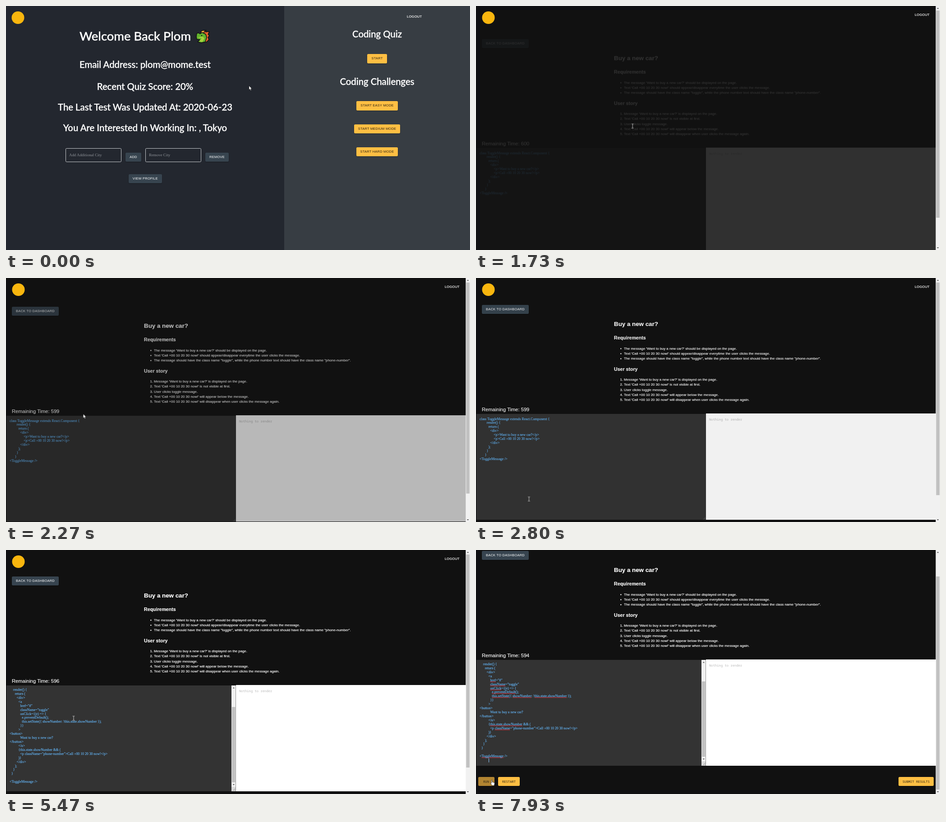
Animation of 1029 by 544 pixels, one loop 8000 ms. Source, as an HTML page:

```html
<!DOCTYPE html>
<html lang="en">
<head>
<meta charset="utf-8">
<title>Coding challenge</title>
<style>
@property --left { syntax: "<integer>"; inherits: false; initial-value: 600; }
html, body { margin: 0; width: 100%; height: 100%; overflow: hidden; background: #111; }
body, .layer { position: absolute; inset: 0; }
svg { position: absolute; left: 0; top: 0; overflow: visible; }
body { font: 7.8px "Liberation Sans", Arial, sans-serif; color: #fff; }
text { fill: #fff; stroke: #fff; stroke-width: .18px; }
body *, .timer::after { animation: 8s linear infinite; }

.btn { position: absolute; height: 20.3px; border-radius: 2.3px; background: #37444f; color: #fff;
  font-size: 7.5px; line-height: 20.5px; letter-spacing: .0286em; text-align: center; white-space: nowrap;
  box-shadow: 0 1px 2px rgba(0,0,0,.3); }
.gold { background: #ffbf43; color: #2b2413; }
.mono { font-family: "Noto Sans Mono", "DejaVu Sans Mono", monospace; font-size: 7.2px; letter-spacing: 0; }

/* dashboard */
.dash { background: linear-gradient(90deg, #23272f 617.5px, #373d43 617.5px); animation-name: dash; animation-timing-function: step-end; }
.dash .head { font: 500 20.3px Lato, sans-serif; text-anchor: middle; }
.head text { stroke-width: .4px; }
.dash .title { font-size: 27.4px; }
.dash .hint { font: 8.9px "Liberation Serif", serif; fill: #90949a; stroke: none; }
.easy { animation-name: easy; }
@keyframes dash { 0% { visibility: visible; } 15.6%, 100% { visibility: hidden; } }
@keyframes easy { 0%, 9% { background: #ffbf43; } 12%, 100% { background: #b2862f; } }

/* challenge page */
.page { animation-name: scroll; }
.body { animation-name: rise; }
@keyframes scroll { 0%, 82.2% { transform: none; animation-timing-function: ease-in-out; } 86.6%, 100% { transform: translateY(-57px); } }
@keyframes rise {
  0%, 18.75% { opacity: 0; transform: translateY(17px); animation-timing-function: ease; }
  41.9%, 100% { opacity: 1; transform: none; }
}
.h2 { font-weight: bold; font-size: 13.35px; }
.h3 { font-weight: bold; font-size: 10.6px; }
.timer { position: absolute; left: 13px; top: 286px; font-size: 11.15px; line-height: 13px; white-space: pre; -webkit-text-stroke: .15px; }
.timer::after { counter-reset: left var(--left); content: counter(left); animation-name: countdown; animation-timing-function: step-end; }
@keyframes countdown {
  0% { --left: 600; } 28.3% { --left: 599; } 40.8% { --left: 598; } 53.3% { --left: 597; }
  65.8% { --left: 596; } 78.3% { --left: 595; } 90.8%, 100% { --left: 594; }
}
.editor { position: absolute; left: 1px; top: 302px; width: 508.5px; height: 236px; background: #333; overflow: hidden; }
.result { position: absolute; left: 510px; top: 301.4px; width: 510px; height: 237px; background: #fff; color: #b9b9b9; }
.result span { position: absolute; left: 7px; top: 8px; }

pre { position: absolute; left: 7px; top: 7.5px; margin: 0; color: #64b5f6; -webkit-text-stroke: .15px;
  font: 7.8px/8.92px "Liberation Serif", "Times New Roman", serif; }
u { text-decoration: underline .7px #e0313c; text-underline-offset: .8px; }
mark { background: #0a66d8; color: #fff; padding-right: 2px; -webkit-box-decoration-break: clone; box-decoration-break: clone; }
.before { animation-name: before; animation-timing-function: step-end; }
.select { animation-name: select; }
.after, .bar { animation-name: after; animation-timing-function: step-end; }
.after pre { animation-name: wheel; }
.after u { animation-name: spell; animation-timing-function: step-end; }
.thumb { animation-name: thumb; }
.caret { position: absolute; width: .8px; height: 9px; background: #8fcbff; animation-name: caret; animation-timing-function: step-end; }
@keyframes before { 0% { visibility: visible; } 59.4%, 100% { visibility: hidden; } }
@keyframes after { 0% { opacity: 0; } 59.4%, 100% { opacity: 1; } }
@keyframes select { 0%, 42.5% { clip-path: inset(100% 0 0 0); animation-timing-function: steps(12); } 47.5%, 100% { clip-path: inset(0); } }
@keyframes wheel { 0%, 65.5% { transform: none; animation-timing-function: ease-in-out; } 68.2%, 100% { transform: translateY(-55.5px); } }
@keyframes thumb { 0%, 65.5% { transform: none; animation-timing-function: ease-in-out; } 68.2%, 100% { transform: translateY(38px); } }
@keyframes spell { 0% { text-decoration-color: transparent; } 72.4%, 100% { text-decoration-color: #e0313c; } }
@keyframes caret {
  0%, 59.4%, 72.6%, 85.9%, 99.1%, 100% { opacity: 1; }
  66%, 79.2%, 92.5% { opacity: 0; }
}
.run { animation-name: run; }
@keyframes run { 0%, 95.8% { background: #ffbf43; } 98.4%, 100% { background: #b28531; } }
.pagethumb { animation-name: pagethumb; }
@keyframes pagethumb {
  0%, 18.75% { y: 10px; height: 460px; animation-timing-function: ease; }
  41.9%, 82.2% { y: 10px; height: 475px; animation-timing-function: ease-in-out; }
  86.6%, 100% { y: 59px; height: 475px; }
}

/* pointer */
.pointer { animation-name: move; }
@keyframes move {
  0%, .6% { transform: translate(539px, 178px); }
  4.5% { transform: translate(665px, 170px); }
  8% { transform: translate(785px, 190px); animation-timing-function: ease-out; }
  10.9%, 15.6% { transform: translate(815px, 219px); }
  21.625% { transform: translate(347.5px, 267.5px); }
  28.375% { transform: translate(171.5px, 302.7px); animation-timing-function: ease-out; }
  35%, 38% { transform: translate(117.5px, 492.7px); animation-timing-function: ease-in-out; }
  45.9%, 56% { transform: translate(11px, 306.5px); animation-timing-function: ease-in-out; }
  63.4%, 66% { transform: translate(150px, 372.5px); }
  68.2%, 72.5% { transform: translate(150px, 375px); animation-timing-function: ease-in-out; }
  80%, 88.4% { transform: translate(257px, 231px); animation-timing-function: ease-in-out; }
  98%, 100% { transform: translate(35px, 513px); }
}
.arrow, .beam, .hand { animation-timing-function: step-end; }
.arrow { animation-name: arrow; }
.beam { animation-name: beam; }
.hand { animation-name: hand; }
@keyframes arrow { 0%, 15.6%, 25%, 77% { opacity: 1; } 9%, 20%, 29%, 95.8%, 100% { opacity: 0; } }
@keyframes beam { 0%, 25%, 64.1%, 77%, 100% { opacity: 0; } 20%, 29%, 65.9% { opacity: 1; } }
@keyframes hand { 0%, 15.6% { opacity: 0; } 9%, 95.8%, 100% { opacity: 1; } }
</style>
</head>
<body>

<div class="layer page">
  <svg width="1029" height="601">
    <circle cx="27.5" cy="26" r="14" fill="#f9b60e"/>
    <text x="973" y="22.3" font-size="7.5" letter-spacing=".2">LOGOUT</text>
  </svg>
  <div class="layer body">
    <div class="btn" style="left:13px;top:59px;width:104px">BACK TO DASHBOARD</div>
    <svg width="1029" height="601">
      <text class="h2" x="306" y="106.2">Buy a new car?</text>
      <text class="h3" x="306" y="135.8">Requirements</text>
      <g fill="#fff"><circle cx="321.3" cy="156.6" r="1.25"/><circle cx="321.3" cy="167.7" r="1.25"/><circle cx="321.3" cy="178.9" r="1.25"/></g>
      <text y="147.5">
        <tspan x="328" dy="11.15">The message 'Want to buy a new car?' should be displayed on the page.</tspan>
        <tspan x="328" dy="11.15">Text 'Call +00 10 20 30 now!' should appear/disappear everytime the user clicks the message.</tspan>
        <tspan x="328" dy="11.15">The message should have the class name "toggle", while the phone number text should have the class name "phone-number".</tspan>
      </text>
      <text class="h3" x="306" y="205.5">User story</text>
      <text y="217.1">
        <tspan x="319.4" dy="11.15">1.</tspan><tspan x="328">Message 'Want to buy a new car?' is displayed on the page.</tspan>
        <tspan x="319.4" dy="11.15">2.</tspan><tspan x="328">Text 'Call +00 10 20 30 now!' is not visible at first.</tspan>
        <tspan x="319.4" dy="11.15">3.</tspan><tspan x="328">User clicks toggle message.</tspan>
        <tspan x="319.4" dy="11.15">4.</tspan><tspan x="328">Text 'Call +00 10 20 30 now!' will appear below the message.</tspan>
        <tspan x="319.4" dy="11.15">5.</tspan><tspan x="328">Text 'Call +00 10 20 30 now!' will disappear when user clicks the message again.</tspan>
      </text>
    </svg>
    <div class="timer">Remaining Time: </div>
    <div class="editor">
      <div class="before"><pre>class ToggleMessage extends React.Component {
        render() {
          return (
            &lt;div>
                &lt;p>Want to buy a new car?&lt;/p>
                &lt;p>Call +00 10 20 30 now!&lt;/p>
            &lt;/div>
          );
        }
      }
&lt;ToggleMessage /></pre><pre class="select"><mark>class ToggleMessage extends React.Component {
        render() {
          return (
            &lt;div>
                &lt;p>Want to buy a new car?&lt;/p>
                &lt;p>Call +00 10 20 30 now!&lt;/p>
            &lt;/div>
          );
        }
      }
&lt;<u>ToggleMessage</u> />
         </mark></pre></div>
      <div class="after"><pre>class <u>ToggleMessage</u> extends <u>React.Component</u> {
    constructor(props) {
      super(props);
      this.state = { <u>showNumber</u>: false };
    }

    render() {
      return (
        &lt;div>
          &lt;a
            <u>href</u>="#"
            <u>className</u>="toggle"
            <u>onClick</u>={(e) => {
              <u>e.preventDefault</u>();
              <u>this.setState</u>({ <u>showNumber</u>: !<u>this.state.showNumber</u> });
            }}
          >
&lt;button>
            Want to buy a new car?
&lt;/button>
          &lt;/a>
          {<u>this.state.showNumber</u> &amp;&amp; (
            &lt;p <u>className</u>="phone-number">Call +00 10 20 30 now!&lt;/p>
          )}
        &lt;/div>
      );
    }
  }

&lt;<u>ToggleMessage</u> />
          <i class="caret"></i></pre></div>
    </div>
    <svg width="1029" height="601">
      <path d="M504 537.5l5-5M507 537.5l2-2" stroke="#777" stroke-width=".7"/>
      <g class="bar">
        <path fill="#f1f1f1" d="M500 302h9.5v226h-9.5z"/>
        <path fill="#dcdcdc" d="M500 528h9.5v10h-9.5z"/>
        <path d="M503 537l5.5-5.5M506 537l2.5-2.5" stroke="#777" stroke-width=".7"/>
        <path fill="#505050" d="M502.7 308.5l2.2-2.4 2.2 2.4zM502.7 522l2.2 2.4 2.2-2.4z"/>
        <rect class="thumb" x="501" y="312" width="7.5" height="168" fill="#c1c1c1"/>
      </g>
    </svg>
    <div class="result mono"><span>Nothing to render</span></div>
    <div class="btn gold mono run" style="left:4.5px;top:563px;width:36px">RUN</div>
    <div class="btn gold mono" style="left:49px;top:563px;width:48px">RESTART</div>
    <div class="btn gold mono" style="left:937px;top:563px;width:78px">SUBMIT RESULTS</div>
  </div>
</div>

<svg width="1029" height="544">
  <path fill="#f1f1f1" d="M1019.5 0h9.5v544h-9.5z"/>
  <path fill="#505050" d="M1022 6.2l2.3-2.5 2.3 2.5zM1022 538l2.3 2.5 2.3-2.5z"/>
  <rect class="pagethumb" x="1020.5" y="10" width="7.5" height="475" fill="#c1c1c1"/>
</svg>

<div class="layer dash">
  <svg width="1029" height="544">
    <circle cx="26.5" cy="26" r="14" fill="#f9b60e"/>
    <text x="889" y="26.2" font-size="7.6" letter-spacing=".2">LOGOUT</text>
    <g class="head">
      <text class="title" x="286.5" y="77">Welcome Back Plom</text>
      <text x="308.5" y="138.3">Email Address: plom@mome.test</text>
      <text x="308.5" y="187">Recent Quiz Score: 20%</text>
      <text x="308.5" y="233">The Last Test Was Updated At: 2020-06-23</text>
      <text x="308.5" y="279">You Are Interested In Working In: , Tokyo</text>
      <text x="823" y="70.3">Coding Quiz</text>
      <text x="823" y="176">Coding Challenges</text>
    </g>
    <g stroke="#111" stroke-width="1.5" stroke-linejoin="round">
      <path fill="#f0642d" d="M434 56l10-2-2 4 9-1-3 6 3 3-3 4 2 5-5 5-11 1z"/>
      <path fill="#fbb43a" d="M431 61l3-6 8-1-5 8z"/>
      <path fill="#62b32e" d="M423 61l4-1 3 2 5-3 8 4 2 7-3 10-9 2-8-2 5-5-7-1-1-5z"/>
      <path fill="#a6d23c" stroke="none" d="M424 70l10 2-6 7 8 1 4-8-4-4z"/>
      <circle cx="434" cy="66" r="1.3" fill="#111" stroke="none"/>
    </g>
    <g fill="none" stroke="#c6c9cc">
      <rect x="132.5" y="317.5" width="123" height="30" rx="2"/>
      <rect x="309.5" y="317.5" width="123" height="30" rx="2"/>
    </g>
    <text class="hint" x="140" y="335.3">Add Additional City</text>
    <text class="hint" x="317" y="335.3">Remove City</text>
  </svg>
  <div class="btn" style="left:265px;top:327px;width:35px">ADD</div>
  <div class="btn" style="left:442px;top:327px;width:52px">REMOVE</div>
  <div class="btn" style="left:272px;top:375px;width:73.5px">VIEW PROFILE</div>
  <div class="btn gold" style="left:801px;top:107.4px;width:44px">START</div>
  <div class="btn gold easy" style="left:777px;top:212.4px;width:92px">START EASY MODE</div>
  <div class="btn gold" style="left:772px;top:263.8px;width:102px">START MEDIUM MODE</div>
  <div class="btn gold" style="left:777px;top:315px;width:92px">START HARD MODE</div>
</div>

<svg width="1029" height="544">
  <g class="pointer">
    <path class="arrow" d="M0 0v8.7l2-1.7 1.4 3.2 1.5-.7-1.4-3h2.7z" fill="#fff" stroke="#111" stroke-width=".5"/>
    <path class="beam" d="M-2.3-4.7h1.7l.6.5.6-.5h1.7M-2.3 4.7h1.7l.6-.5.6.5h1.7M0-4.2v8.4" fill="none" stroke="#ddd" stroke-width=".9"/>
    <path class="hand" d="M-1 .5q1-1.3 2 0v4l4 .8q1.5.5 1.3 2l-.8 4.7h-5l-3.5-5q.4-1.5 2 .2z" fill="#fff" stroke="#111" stroke-width=".7"/>
  </g>
</svg>
</body>
</html>
```
